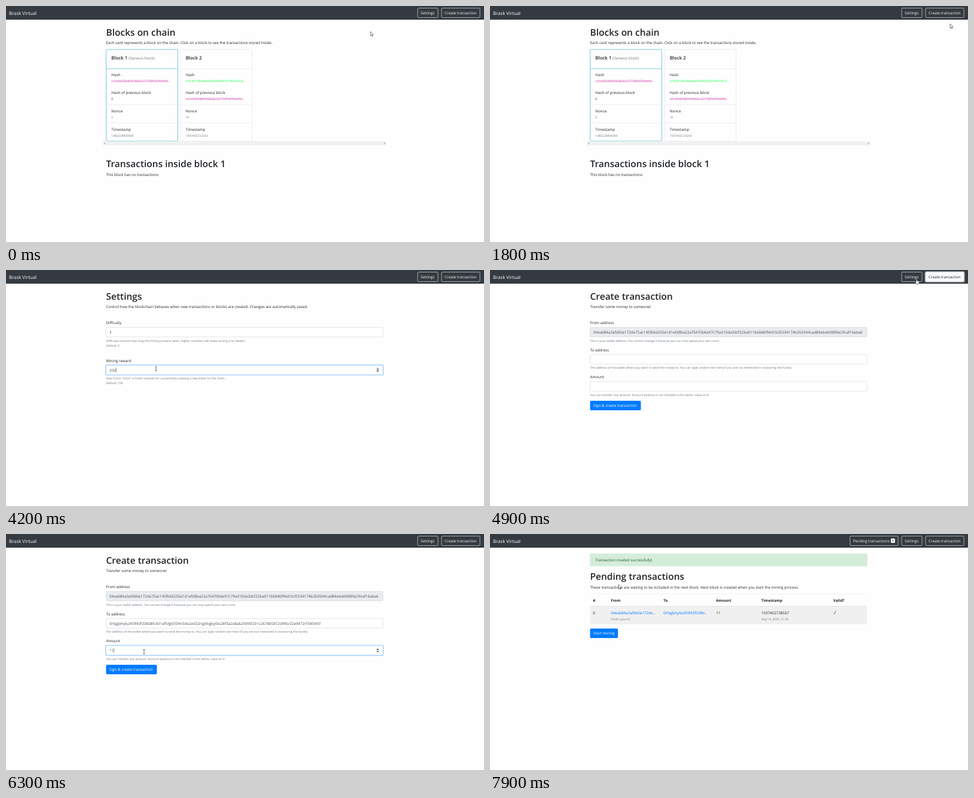
Animation of 800x397 px, one loop 8 s. Source, as an HTML page:

```html
<!DOCTYPE html>
<html lang="en">
<head>
<meta charset="utf-8">
<title>Blockchain demo</title>
<style>
  html, body { margin: 0; width: 100%; height: 100%; overflow: hidden; background: #fefefe; }
  svg { display: block; width: 800px; height: 397px; }
  text { font: 6.27px "Open Sans", "Noto Sans", sans-serif; fill: #212529; text-rendering: geometricPrecision; white-space: pre; }
  .h1 { font-size: 15.5px; font-weight: 600; }
  .h5 { font-size: 7.83px; font-weight: 600; }
  .brand { font-size: 7.83px; fill: #fff; }
  .b { font-weight: 700; }
  .small { font-size: 5.01px; }
  .muted { fill: #6c757d; }
  .field { fill: #495057; }
  .link { fill: #007bff; }
  .light { fill: #f8f9fa; }
  .ok { fill: #155724; }
  .badge { font-size: 4.7px; font-weight: 700; }
</style>
</head>
<body>
<svg id="stage" viewBox="0 0 800 397"></svg>
<script>
const LOOP = 8000, STEP = 100, LEFT = 167.5, RIGHT = 631;
const stage = document.getElementById('stage');

const HASH1 = 'cd1e9d208d0fa58d3e323758f9d59ed4fd…';
const HASH2 = '07fc3f12d5afeb9ac0390f03f321f4637b1d…';
const WALLET = '04ea684a3afd60e172de75ac145fb66250a1d1efd8ba22a76470b6e97c79a310da3dcf22ba011b6846f94d1b35334174b2b3544cad84ebddd989e29caf16aba6';
const TARGET = '0rfagbhy6uf43f43f338d8fc431ef5fg655f4r3de2ed32rtg6hgbytbs28f3a2e8ab2fd95f201c267865872d9fbc32e9472rf34f345f';

// Pointer stops: time, x, y, shape
const POINTER = [
  [0, 610, 43, 'arrow'], [100, 660, 28, 'arrow'], [300, 350, 95, 'hand'], [400, 350, 95, 'arrow'],
  [600, 284, 308, 'hand'], [800, 284, 308, 'arrow'], [900, 330, 288, 'arrow'],
  [1300, 30, 10, 'hand'], [1500, 30, 10, 'arrow'], [1800, 770, 30, 'arrow'],
  [1900, 706, 12, 'hand'], [2200, 708, 26, 'arrow'], [2500, 717, 76, 'arrow'],
  [2700, 300, 104, 'beam'], [2900, 182, 104, 'beam'], [3000, 160, 104, 'beam'],
  [3300, 190, 168, 'beam'], [3400, 150, 168, 'beam'], [3600, 249, 166, 'beam'],
  [3700, 251, 166, 'beam'], [4300, 251, 166, 'arrow'], [4700, 755, 11, 'hand'],
  [4900, 714, 15, 'hand'], [5000, 600, 60, 'arrow'], [5300, 300, 150, 'beam'],
  [5800, 300, 150, 'beam'], [5900, 231, 198, 'beam'], [6400, 231, 198, 'arrow'],
  [6700, 215, 228, 'hand'], [7300, 215, 228, 'arrow'], [7900, 215, 85, 'arrow']
];

// Pages by start time
const PAGES = [
  [0, () => chain(1)], [400, () => chain(2)], [800, wallet], [1500, () => chain(1)],
  [2100, settings], [4800, create], [7300, pending]
];

const at = (table, t) => table.findLast(row => row[0] <= t);
const within = (t, a, b) => t >= a && t < b;

const text = (x, y, s, cls = '', fill = '') =>
  `<text x="${x}" y="${y}" class="${cls}"${fill && ` style="fill:${fill}"`}>${s}</text>`;
const rect = (x, y, w, h, fill, stroke = 'none', r = 0, sw = .6) =>
  `<rect x="${x}" y="${y}" width="${w}" height="${h}" rx="${r}" fill="${fill}" stroke="${stroke}" stroke-width="${sw}"/>`;
const rule = (x1, x2, y, color = '#dee2e6', w = .5) =>
  `<path d="M${x1} ${y}H${x2}" stroke="${color}" stroke-width="${w}"/>`;
const shape = (d, fill) => `<path d="${d}" fill="${fill}"/>`;

function navButton(x, w, label, filled, ring) {
  return (ring ? rect(x - .8, 2.7, w + 1.6, 17.6, 'none', '#96999d', 2.4, 1.4) : '') +
    rect(x, 3.5, w, 16, filled ? '#f8f9fa' : 'none', '#f8f9fa', 1.7) +
    text(x + 5, 13.9, label, filled ? '' : 'light');
}

function nav(t) {
  let out = rect(0, 0, 800, 23, '#343a40') + text(5, 14.6, 'Brask Virtual', 'brand');
  if (t >= 7300) {
    out += navButton(602.5, 80.5, 'Pending transactions') +
      rect(670.8, 7.5, 7, 7.6, '#f8f9fa', 'none', 1.5) + text(673, 13, '1', 'badge');
  }
  return out + navButton(689, 34, 'Settings', within(t, 1900, 2200)) +
    navButton(729, 64.2, 'Create transaction', within(t, 4700, 5000), within(t, 4800, 5300));
}

function card(x, active, title, note, hash, prev, nonce, stamp) {
  const edge = active ? '#17a2b8' : '#dfdfdf', tx = x + 8.7;
  const tint = s => s.length > 6 ? '#' + s.slice(0, 6) : '#212529';
  return rect(x, 73.2, 120, 154, '#fefefe', edge, 1.7) +
    rule(x, x + 120, 105.6, edge) + rule(x + .4, x + 119.6, 166, '#dfdfdf') + rule(x + .4, x + 119.6, 196.6, '#dfdfdf') +
    text(tx, 90, title, 'h5') + text(tx + 29, 90, note, 'muted') +
    text(tx, 118.4, 'Hash') + text(tx, 128.3, hash, 'small', tint(hash)) +
    text(tx, 148.4, 'Hash of previous block') + text(tx, 158.3, prev, 'small', tint(prev)) +
    text(tx, 179, 'Nonce') + text(tx, 188.9, nonce, 'small muted') +
    text(tx, 209.5, 'Timestamp') + text(tx, 219.5, stamp, 'small muted');
}

function table(y, cols, cells, notes) {
  const heads = ['#', 'From', 'To', 'Amount', 'Timestamp', 'Valid?'];
  const tick = `<path d="M${cols[5] + .6} ${y + 31.6}l1.3 1.9l2.4 -5" fill="none" stroke="#212529" stroke-width=".6"/>`;
  return rule(LEFT, RIGHT, y) + rect(LEFT, y + 20.7, RIGHT - LEFT, 30.2, '#f1f0f1') +
    rule(LEFT, RIGHT, y + 20.5, '#dee2e6', .85) +
    heads.map((s, i) => text(cols[i], y + 13, s, 'b')).join('') +
    cells.map((s, i) => text(cols[i], y + 33.8, s, /^(hi|0\w+…|0rf.*)$/.test(s) ? 'link' : '')).join('') +
    notes.map(([i, s]) => text(cols[i], y + 43.7, s, 'small muted')).join('') + tick;
}

const rewardTable = y => table(y, [172.3, 206.3, 281.3, 323.6, 429, 566],
  ['0', 'System', 'hi', '100', '1597402723242'], [[3, '(Block reward)'], [4, 'Aug 14, 2020, 11:58']]);

function chain(block) {
  return text(LEFT, 49.8, 'Blocks on chain', 'h1') +
    text(LEFT, 64, 'Each card represents a block on the chain. Click on a block to see the transactions stored inside.') +
    card(167.6, block === 1, 'Block 1', '(Genesis block)', HASH1, '0', '0', '1483228800000') +
    card(292, block === 2, 'Block 2', '', HASH2, HASH1, '10', '1597402723242') +
    rect(162, 227.5, 474.6, 7, '#f1f1f1') +
    shape('M165.8 229.6v3l-1.7 -1.5z', '#8f8f8f') + shape('M632.8 229.6v3l1.7 -1.5z', '#8f8f8f') +
    text(LEFT, 270.9, 'Transactions inside block ' + block, 'h1') +
    (block === 1 ? text(LEFT, 285.6, 'This block has no transactions') : rewardTable(278));
}

function wallet() {
  return text(LEFT, 49.8, 'Wallet details', 'h1') +
    text(LEFT, 64, 'Address:', 'b') + text(LEFT, 74.2, 'hi') +
    text(LEFT, 90.8, 'Balance:', 'b') + text(LEFT, 100.9, '100') +
    rule(LEFT, RIGHT, 110, '#e5e5e5') +
    text(LEFT, 133.9, 'Transactions', 'h1') + rewardTable(140.8);
}

function input(y, value, { focus, caret, selected, spin, disabled } = {}) {
  let out = focus ? rect(LEFT - .7, y - .7, 465, 17.4, 'none', '#bfdeff', 2.2, 1.4) : '';
  out += rect(LEFT, y, RIGHT - LEFT, 16, disabled ? '#e9ecef' : '#fff', focus ? '#80bdff' : '#ced4da', 1.7);
  if (selected) out += rect(173, y + 3.6, value.length * 3.585, 8.8, '#0078d7');
  out += `<g clip-path="url(#inner)">${text(173, y + 10.6, value, 'field' + (caret ? ' typed' : ''), selected ? '#fff' : '')}</g>`;
  if (spin) {
    out += rect(619, y + 3.6, 6.2, 8.8, '#efefef') +
      shape(`M620.4 ${y + 7.2}l1.8 -2.2l1.8 2.2z`, '#444') + shape(`M620.4 ${y + 8.9}l1.8 2.2l1.8 -2.2z`, '#444');
  }
  return out;
}

function group(y, label, hints, value, opts) {
  return text(LEFT, y - 5.5, label) + input(y, value, opts) +
    hints.map((s, i) => text(LEFT, y + 23.9 + i * 8.1, s, 'small muted')).join('');
}

const button = (y, w, label) => t =>
  rect(LEFT, y, w, 16, within(t, 6700, 7300) ? '#0069d9' : '#007bff', 'none', 1.7) +
  text(173, y + 10.4, label, '', '#fff');

function settings(t) {
  const first = t < 3300;
  const reward = at([[0, '100'], [3700, '2'], [4100, '20'], [4200, '200']], t)[1];
  const picked1 = within(t, 3000, 3100), picked2 = within(t, 3400, 3700);
  return text(LEFT, 49.8, 'Settings', 'h1') +
    text(LEFT, 64, 'Control how the blockchain behaves when new transactions or blocks are created. Changes are automatically saved.') +
    group(96.6, 'Difficulty',
      ['Difficulty controls how long the mining process takes. Higher numbers will make mining a lot slower!', 'Default: 2'],
      t < 3100 ? '1' : '3', { focus: first, spin: first, caret: first && !picked1, selected: picked1 }) +
    group(160.2, 'Mining reward',
      ['How much "coins" a miner receives for successfully creating a new block for the chain.', 'Default: 100'],
      reward, { focus: !first, spin: !first, caret: !first && !picked2 && !within(t, 3900, 4100), selected: picked2 });
}

function create(t) {
  const typed = Math.max(0, Math.min(1, (t - 5300) / 500));
  const toFocus = within(t, 5300, 6000), amountFocus = t >= 6000;
  const amount = at([[0, ''], [6100, '1'], [6200, '11']], t)[1];
  return text(LEFT, 49.8, 'Create transaction', 'h1') + text(LEFT, 64, 'Transfer some money to someone!') +
    group(96.6, 'From address',
      ['This is your wallet address. You cannot change it because you can only spend your own coins.'], WALLET, { disabled: true }) +
    group(142.2, 'To address',
      ['The address of the wallet where you want to send the money to. You can type random text here (if you are not interested in recovering the funds)'],
      TARGET.slice(0, Math.round(typed * TARGET.length)), { focus: toFocus, caret: toFocus }) +
    group(187.8, 'Amount',
      ['You can transfer any amount. Account balance is not checked in this demo. Have at it!'],
      amount, { focus: amountFocus, spin: amountFocus, caret: amountFocus && t % 1000 < 500 }) +
    button(220, 85, 'Sign &amp; create transaction')(t);
}

function pending(t) {
  return rect(LEFT, 33.2, RIGHT - LEFT, 20.6, '#d4edda', '#c3e6cb', 1.7) +
    text(176.2, 46.2, 'Transaction created successfully!', 'ok') +
    text(LEFT, 77.4, 'Pending transactions', 'h1') +
    text(LEFT, 91.8, 'These transactions are waiting to be included in the next block. Next block is created when you start the mining process.') +
    table(101, [172.3, 202.2, 290.2, 378.3, 454, 574.6],
      ['0', WALLET.slice(0, 20) + '…', TARGET.slice(0, 21) + '…', '11', '1597402738567'],
      [[1, "(That's yours!)"], [4, 'Aug 14, 2020, 11:58']]) +
    button(159, 46.6, 'Start mining')(7300);
}

const CURSORS = {
  arrow: '<path d="M0 0V7.2L1.7 5.7L2.8 8.2L3.9 7.7L2.8 5.3H4.9Z" fill="#fff" stroke="#222" stroke-width=".6"/>',
  beam: '<path d="M-1.5 -3.6H-.4L0 -3.2L.4 -3.6H1.5M0 -3.2V3.2M-1.5 3.6H-.4L0 3.2L.4 3.6H1.5" fill="none" stroke="#222" stroke-width=".7"/>',
  hand: '<path d="M-.8 .6Q0 -.5 .8 .6V3L3.6 3.7Q4.4 4 4.3 5L3.7 8.6H-.3L-2.4 5.6Q-2.4 4.6 -1.5 4.9L-.8 5.5Z" fill="#fff" stroke="#222" stroke-width=".6"/>'
};

function pointer(t) {
  const i = POINTER.findLastIndex(p => p[0] <= t);
  const [t0, x0, y0, kind] = POINTER[i];
  const [t1, x1, y1] = POINTER[i + 1] || [LOOP, x0, y0];
  const k = (t - t0) / (t1 - t0);
  return `<g transform="translate(${x0 + (x1 - x0) * k} ${y0 + (y1 - y0) * k})">${CURSORS[kind]}</g>`;
}

function draw(t) {
  stage.innerHTML = '<clipPath id="inner"><rect x="172.5" width="453.5" height="397"/></clipPath>' +
    nav(t) + at(PAGES, t)[1](t) + pointer(t);
  const typed = stage.querySelector('.typed');
  if (typed) {
    const x = 173.4 + typed.getComputedTextLength(), y = +typed.getAttribute('y');
    typed.insertAdjacentHTML('afterend', `<path d="M${x} ${y - 6.4}v8" stroke="#222" stroke-width=".5"/>`);
  }
}

const start = performance.now();
let shown = -1;
function tick() {
  const t = Math.floor((performance.now() - start) % LOOP / STEP) * STEP;
  if (t !== shown) draw(shown = t);
  requestAnimationFrame(tick);
}
tick();
</script>
</body>
</html>
```
